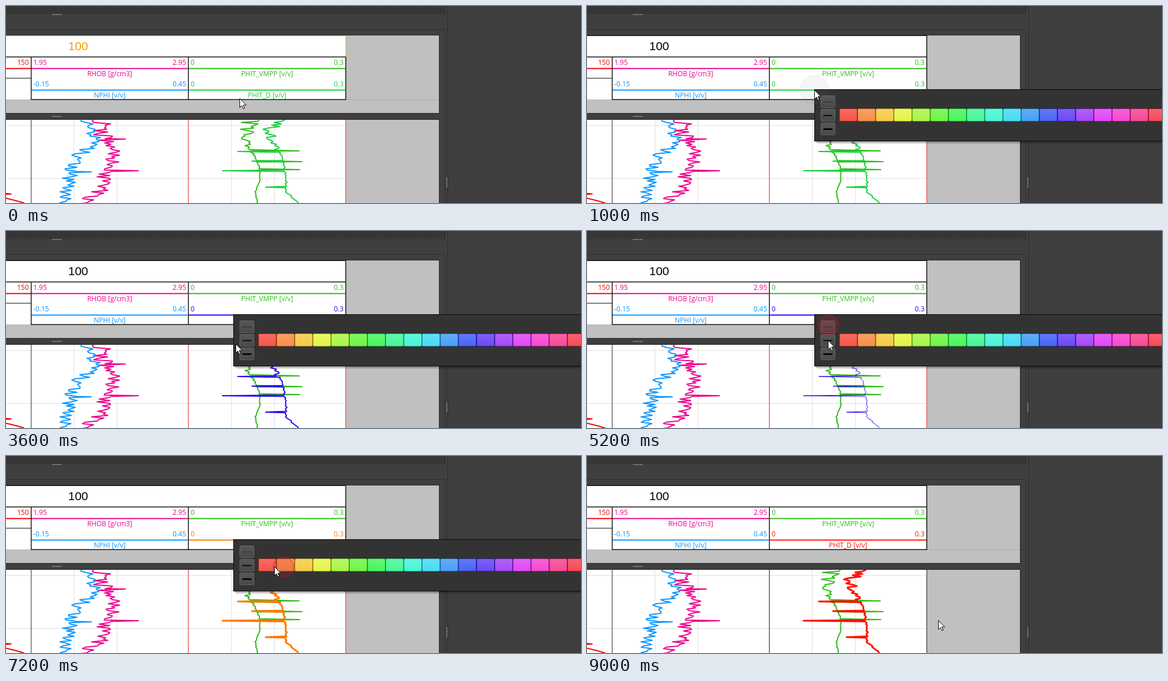
Recreate the animation shown at these times as an HTML page with a canvas. Size 1012x348 px, loop 9.8 s.

```html
<!DOCTYPE html>
<html lang="en">
<head>
<meta charset="utf-8">
<title>Curve style popup</title>
<style>
html, body { margin: 0; width: 100%; height: 100%; overflow: hidden; background: #3f3f3f; }
canvas { display: block; }
</style>
</head>
<body>
<canvas id="stage" width="1012" height="348"></canvas>
<script>
const ctx = document.getElementById('stage').getContext('2d');
const LOOP = 9800, STEP = 200;
const POPUP_OPEN = 800, POPUP_CLOSE = 8600;
const MAGENTA = '#ec008c', BLUE = '#0a96ff', GREEN = '#2cbd16', RED = '#f00000', INK = '#111';

// Trend: x at even steps down the track. Noise: amplitude at top and bottom. Spikes: [y, x].
const logs = {
  rhob: { seed: 5, trend: [165, 168, 180, 186, 190, 168, 165, 140], noise: [22, 16], spikes: [[235, 210], [291, 233]] },
  nphi: { seed: 8, trend: [140, 152, 160, 126, 114, 112, 104, 105], noise: [12, 13], spikes: [[293, 150]] },
  vmpp: { seed: 3, trend: [428, 426, 422, 437, 446, 447, 439, 442], noise: [20, 1], spikes: [[256, 516], [275, 521], [289, 517]] },
  phitD: { seed: 9, trend: [478, 460, 468, 485, 490, 493, 492, 514], noise: [20, 2],
    spikes: [[257, 408], [274, 433], [291, 381], [320, 457]] },
};

// Each click leaves a ripple and may restyle the PHIT_D curve.
const clicks = [
  { at: 600, x: 400, y: 148, rgb: '120,120,140', colour: '#17cf3c', width: 2 },
  { at: 2600, x: 855, y: 200, colour: '#2a00f5' },
  { at: 5000, x: 425, y: 167, width: 1, lead: STEP },
  { at: 5800, x: 425, y: 216, width: 3 },
  { at: 7000, x: 488, y: 196, colour: '#ff7a00' },
  { at: 7600, x: 457, y: 194, colour: '#ff1400' },
];

// Pointer stops: time, x, y.
const stops = [[0, 412, 163], [600, 401, 148], [1000, 401, 148], [2200, 855, 202], [2400, 855, 202],
  [2600, 851, 195], [3600, 405, 199], [4600, 425, 170], [5000, 425, 170], [5400, 424, 216],
  [6000, 424, 216], [6800, 488, 196], [7000, 488, 196], [7400, 457, 194], [7600, 457, 194],
  [8200, 642, 306], [8400, 642, 306], [9000, 619, 290], [LOOP, 619, 290]];

const mix = (a, b, k) => a + (b - a) * k;

function random(seed) {
  return () => {
    seed = (seed * 16807) % 2147483647;
    return seed / 2147483647;
  };
}

function styleAt(t) {
  const style = { colour: clicks[0].colour, width: clicks[0].width };
  for (const { at, colour, width, lead = 0 } of clicks) {
    if (t < at - lead) continue;
    style.colour = colour || style.colour;
    style.width = width || style.width;
  }
  return style;
}

function rect(x, y, w, h, fill) {
  ctx.fillStyle = fill;
  ctx.fillRect(x, y, w, h);
}
const hLine = (x1, x2, y, colour, size = 1) => rect(x1, y - size / 2, x2 - x1, size, colour);
const vLine = (x, y1, y2, colour, size = 1) => rect(x - size / 2, y1, size, y2 - y1, colour);

function text(str, x, y, colour, align = 'left', font = '12px "Open Sans", "Noto Sans", sans-serif') {
  ctx.font = font;
  ctx.textAlign = align;
  ctx.fillStyle = colour;
  ctx.fillText(str, x, y);
}

function polyline(points, colour, width) {
  ctx.beginPath();
  points.forEach(([x, y]) => ctx.lineTo(x, y));
  ctx.lineJoin = 'round';
  ctx.strokeStyle = colour;
  ctx.lineWidth = width;
  ctx.stroke();
}

function logCurve({ seed, trend, noise, spikes }, colour, width) {
  const top = 201, height = 147, step = 2.4, points = [];
  const next = random(seed * 7919);
  next();
  for (let y = top; y <= top + height + step; y += step) {
    const k = Math.min((y - top) / height, .999), pos = k * (trend.length - 1), i = Math.floor(pos);
    const amp = mix(noise[0], noise[1], Math.min(1, k * 2.2));
    points.push([mix(trend[i], trend[i + 1], pos - i) + amp * (next() * 2 - 1), y]);
    spikes.filter(s => s[0] >= y && s[0] < y + step).forEach(s => points.push([s[1], s[0]]));
  }
  polyline(points, colour, width);
}

function grip(x, y, dx, dy) {
  for (let i = 0; i < 6; i++) rect(x + i * dx, y + i * dy, 2, 2, '#888');
}

function frame() {
  rect(0, 0, 1012, 348, '#3f3f3f');
  rect(0, 0, 773, 12, '#363636');
  for (let x = 22; x < 773; x += 35) vLine(x + .5, 0, 12, '#3b3b3b');
  hLine(0, 773, 13.5, '#2b2b2b');
  hLine(0, 773, 41.5, '#2f2f2f');
  vLine(772.5, 0, 13, '#2b2b2b');
  vLine(772.5, 41, 348, '#323232');
  vLine(777.5, 0, 348, '#2c2c2c');
  hLine(778, 1012, 347.5, '#323232');
  grip(81, 14, 3, 0);
  grip(81, 194, 3, 0);
  grip(775, 303, 0, 3);
}

function scale(left, right, y, min, max, label, colour) {
  text(min, left + 4, y - 6, colour);
  text(max, right - 4, y - 6, colour, 'right');
  hLine(left + 1, right - 1, y + .5, colour, 2);
  text(label, (left + right) / 2, y + 13.5, colour, 'center');
}

function header(selected, colour) {
  rect(0, 51, 763, 139, '#2a2a2a');
  rect(0, 52, 762, 137, '#c0c0c0');
  rect(0, 52, 598, 113, '#fff');
  hLine(598, 762, 165.5, '#a8a8a8');
  const edge = selected ? '#f5b030' : INK;
  hLine(0, 598, 52.5, edge);
  ctx.setLineDash(selected ? [2, 1] : []);
  polyline([[598, 52], [598, 90]], edge, 1.5);
  ctx.setLineDash([]);
  text('100', 109.5, 78, selected ? '#f5a000' : '#000', 'left', '21px "Liberation Sans", Arial, sans-serif');

  text('150', 40, 104, RED, 'right');
  hLine(0, 44, 110.5, RED, 2);
  scale(44, 321, 110, '1.95', '2.95', 'RHOB [g/cm3]', MAGENTA);
  scale(44, 321, 148, '-0.15', '0.45', 'NPHI [v/v]', BLUE);
  scale(321, 598, 110, '0', '0.3', 'PHIT_VMPP [v/v]', GREEN);
  scale(321, 598, 148, '0', '0.3', 'PHIT_D [v/v]', colour);
  hLine(0, 44, 127.5, INK);
  hLine(0, 598, 90, INK, 1.5);
  hLine(44, 598, 165.3, INK, 1.5);
  for (const x of [44.4, 321, 598]) vLine(x, 90, 166, INK, 1.5);
}

function tracks(active, { colour, width }) {
  rect(0, 200, 763, 148, '#242424');
  rect(0, 201, 598, 147, '#fff');
  rect(598, 201, 164, 147, '#c0c0c0');
  for (const left of [44, 321]) {
    for (const i of [1, 2]) vLine(left + i * 75.7, 201, 348, '#dedede');
  }
  for (const y of [211, 304.5]) hLine(0, 598, y, '#dedede');
  vLine(44.4, 201, 348, '#666', 1.5);
  for (const x of [321, 598]) vLine(x, 201, 348, active ? '#e86060' : '#555', 1.5);

  ctx.save();
  ctx.beginPath();
  ctx.rect(0, 201, 598, 147);
  ctx.clip();
  polyline([[-2, 331], [9, 332], [-2, 333]], RED, 2);
  polyline([[-2, 339], [18, 344], [32, 348]], RED, 2);
  logCurve(logs.rhob, MAGENTA, 2);
  logCurve(logs.nphi, BLUE, 2);
  logCurve(logs.vmpp, GREEN, 2);
  logCurve(logs.phitD, colour, width);
  ctx.restore();
}

function tile(x, y, w, h, top, bottom, border) {
  const shade = ctx.createLinearGradient(0, y, 0, y + h);
  shade.addColorStop(0, top);
  shade.addColorStop(1, bottom);
  ctx.beginPath();
  ctx.roundRect(x + .5, y + .5, w - 1, h - 1, 2);
  ctx.fillStyle = shade;
  ctx.fill();
  ctx.strokeStyle = border;
  ctx.lineWidth = 1;
  ctx.stroke();
}

function popup() {
  for (let i = 0; i < 5; i++) rect(402 + i, 239 + i, 610, 1, `rgba(0,0,0,${.36 - i * .075})`);
  rect(400, 147, 612, 92, '#0c0c0c');
  rect(401, 148, 611, 90, '#333');
  for (let i = 0; i < 3; i++) {
    const y = 158 + i * 24;
    tile(411, y, 26, 22, '#575757', '#484848', '#626262');
    hLine(416, 432, y + 11.5, i ? '#080808' : '#2a2a2a', i + 1);
  }
  for (let i = 0; i < 18; i++) {
    const hue = 4 + i * 20.6;
    tile(444 + i * 32, 181, 32, 23, `hsl(${hue},92%,68%)`, `hsl(${hue},88%,62%)`, `hsl(${hue},75%,36%)`);
  }
}

function ripple(t, { at, x, y, rgb = '215,20,35' }) {
  const phase = (t - at) / STEP;
  if (phase < 0 || phase > 2) return;
  ctx.beginPath();
  ctx.arc(x, y, 11 + 7 * phase, 0, 7);
  ctx.fillStyle = `rgba(${rgb},${.6 * .33 ** phase})`;
  ctx.fill();
  ctx.strokeStyle = `rgba(${rgb},${.75 - .33 * phase})`;
  ctx.lineWidth = 1.5;
  ctx.stroke();
}

function pointer(t) {
  const i = stops.findIndex(stop => stop[0] > t);
  const [t0, x0, y0] = stops[i - 1], [t1, x1, y1] = stops[i];
  const k = (t - t0) / (t1 - t0);
  ctx.save();
  ctx.translate(Math.round(mix(x0, x1, k)) - 1, Math.round(mix(y0, y1, k)));
  const arrow = new Path2D('M.5 .5V16.5L4 13L6.5 18.5L9 17.5L6.5 12H11.5Z');
  ctx.fillStyle = '#fff';
  ctx.fill(arrow);
  ctx.strokeStyle = '#000';
  ctx.lineWidth = 1;
  ctx.stroke(arrow);
  ctx.restore();
}

function draw(t) {
  const style = styleAt(t);
  frame();
  header(t < clicks[0].at, style.colour);
  tracks(t < POPUP_CLOSE, style);
  if (t >= POPUP_OPEN && t < POPUP_CLOSE) popup();
  clicks.forEach(click => ripple(t, click));
  pointer(t);
}

const begin = performance.now();
function tick() {
  const t = (performance.now() - begin) % LOOP;
  draw(Math.floor(t / STEP) * STEP);
  requestAnimationFrame(tick);
}
tick();
</script>
</body>
</html>
```
